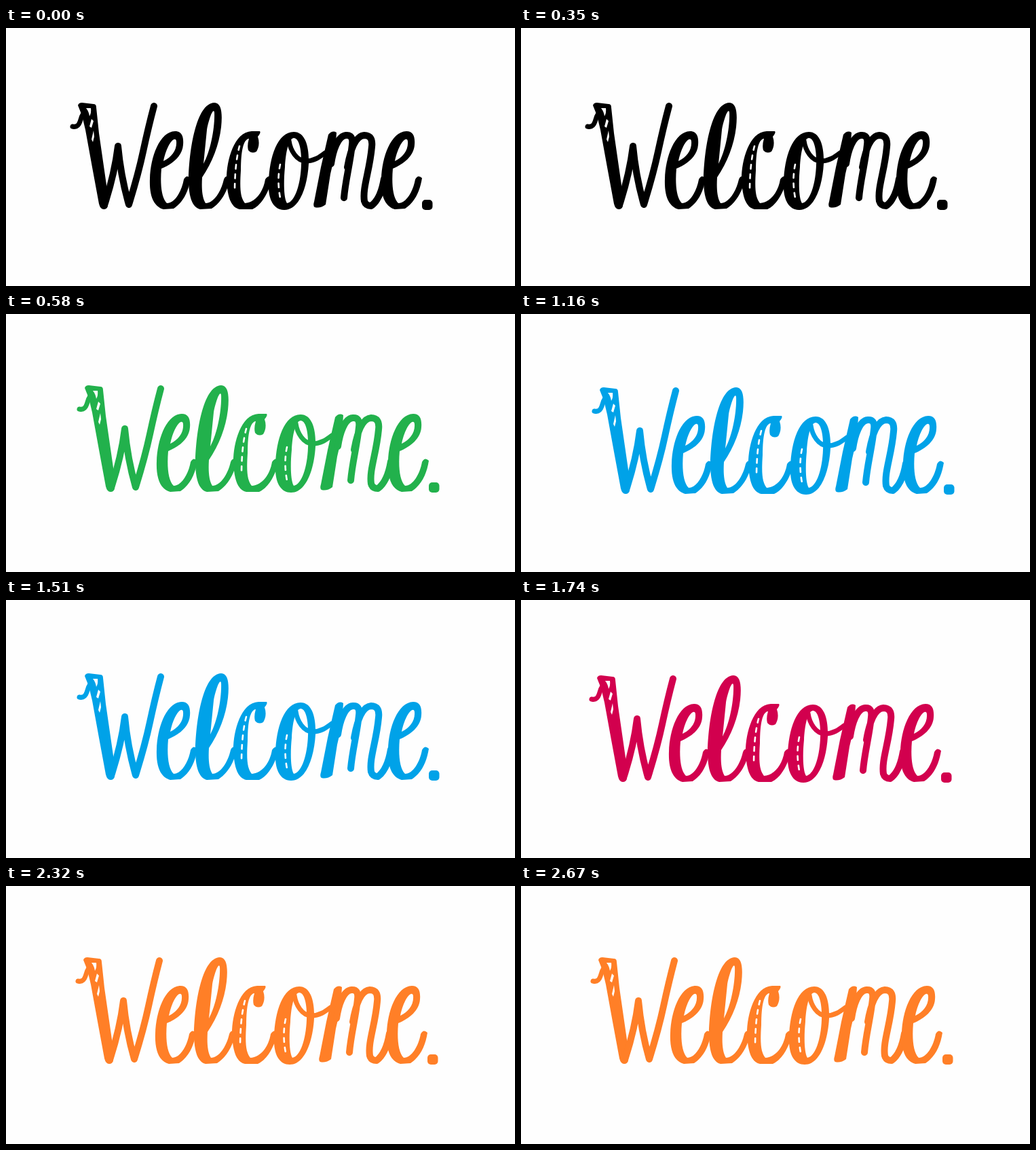
Write an HTML page that moves like this. It is 750x380 px and loops after 2.9 s.

```html
<!DOCTYPE html>
<html lang="en">
<head>
<meta charset="utf-8">
<title>Welcome</title>
<style>
  html, body { margin: 0; width: 100%; height: 100%; overflow: hidden; background: #fefefe; }
  svg { display: block; width: 750px; height: 380px; }
  .shape { fill: currentColor; fill-rule: evenodd; }
  .pen { fill: none; stroke: currentColor; stroke-width: 10; stroke-linecap: round; stroke-linejoin: round; }
  .thin { stroke-width: 7; }
  .gap { fill: #fefefe; }
  .scratch { fill: none; stroke: #fefefe; stroke-width: 2.6; stroke-linecap: round; stroke-dasharray: 6 8; }
</style>
</head>
<body>
<svg viewBox="0 0 750 380" role="img" aria-label="Welcome.">
  <g id="word">
    <!-- W -->
    <path class="shape" d="M106 114Q107 110 112 110L129 112Q133 112 133 117L137 155 149 238 150 262Q149 267 144 267 139 267 137 259L127 205 117 150 112 129Z"/>
    <path class="pen thin" d="M98 145Q106 147 109 138 111 130 115 124"/>
    <path class="pen" d="M145 261Q160 215 165 174Q169 218 181 260Q195 215 202 182Q210 145 218 115"/>
    <path class="gap" d="M118 118L125 118Q126 125 123 130 122 123 118 118ZM126 134L129 137 126 147 123 145ZM129 151L130 160 128 168 126 164Z"/>
    <!-- e -->
    <path id="e" class="shape" d="M272 221C269 240 262 256 247 266L232 267C217 263 211 246 212 222C213 190 226 153 249 152C259 152 262 160 261 172C260 188 246 200 229 207C227 230 229 250 237 258C249 258 259 240 262 223Q266 215 272 221ZM232 196C244 190 252 180 251 167C250 158 238 168 232 196Z"/>
    <!-- l -->
    <path class="shape" d="M330 221C327 240 317 257 303 266L286 267C273 264 269 245 269 222C270 180 280 111 307 110C318 110 319 127 317 146C314 172 304 198 289 220C288 237 289 250 294 258C306 258 317 241 321 223Q324 215 330 221ZM291 200C302 180 308 145 307 124C305 116 298 138 296 150Z"/>
    <!-- c -->
    <path class="shape" d="M392 221C388 240 378 260 363 267L344 267C331 264 326 248 325 222C325 195 336 153 362 152L374 152Q376 154 371 160 375 172 369 182 362 186 357 180 355 173 358 163C350 164 346 180 346 210C344 240 346 250 352 258C368 257 379 241 382 223Q387 215 392 221Z"/>
    <path class="scratch" d="M344 174Q337 200 337 243"/>
    <!-- o -->
    <path class="shape" d="M424 153C441 153 447 175 446 200C444 235 432 268 410 268C394 268 386 252 387 228C388 190 400 153 424 153ZM424 162C432 162 436 180 435 202C434 230 426 256 414 258C409 250 409 225 411 205C412 185 416 163 424 162Z"/>
    <path class="scratch" d="M404 201Q399 224 404 250"/>
    <path class="pen thin" d="M417 166C419 180 428 196 442 196C454 196 462 190 470 184"/>
    <!-- m -->
    <path class="shape" d="M475 157Q481 150 487 154L485 185 478 215 471 260Q463 266 455 264 452 262 454 256L464 205Z"/>
    <path class="pen" d="M479 200C482 180 489 159 501 158Q512 157 510 172C507 200 500 225 498 250M503 205C507 182 514 159 528 158Q541 158 539 175C536 210 525 235 528 255Q530 262 538 262Q552 252 557 222"/>
    <use href="#e" x="341"/>
    <rect class="shape" x="613" y="253" width="15.5" height="15" rx="5"/>
  </g>
</svg>
<script>
  const STEP = 580;
  const poses = [
    { color: "#000000", x: 0, y: 0 },
    { color: "#22b14c", x: 10, y: -5 },
    { color: "#00a2e8", x: 10, y: -2 },
    { color: "#d2004e", x: 6, y: 1 },
    { color: "#ff7f27", x: 8, y: -5 }
  ];
  const word = document.getElementById("word");
  const start = performance.now();

  function draw() {
    const elapsed = performance.now() - start;
    const { color, x, y } = poses[Math.floor(elapsed / STEP) % poses.length];
    word.style.color = color;
    word.setAttribute("transform", `translate(${x} ${y})`);
    requestAnimationFrame(draw);
  }
  draw();
</script>
</body>
</html>
```
